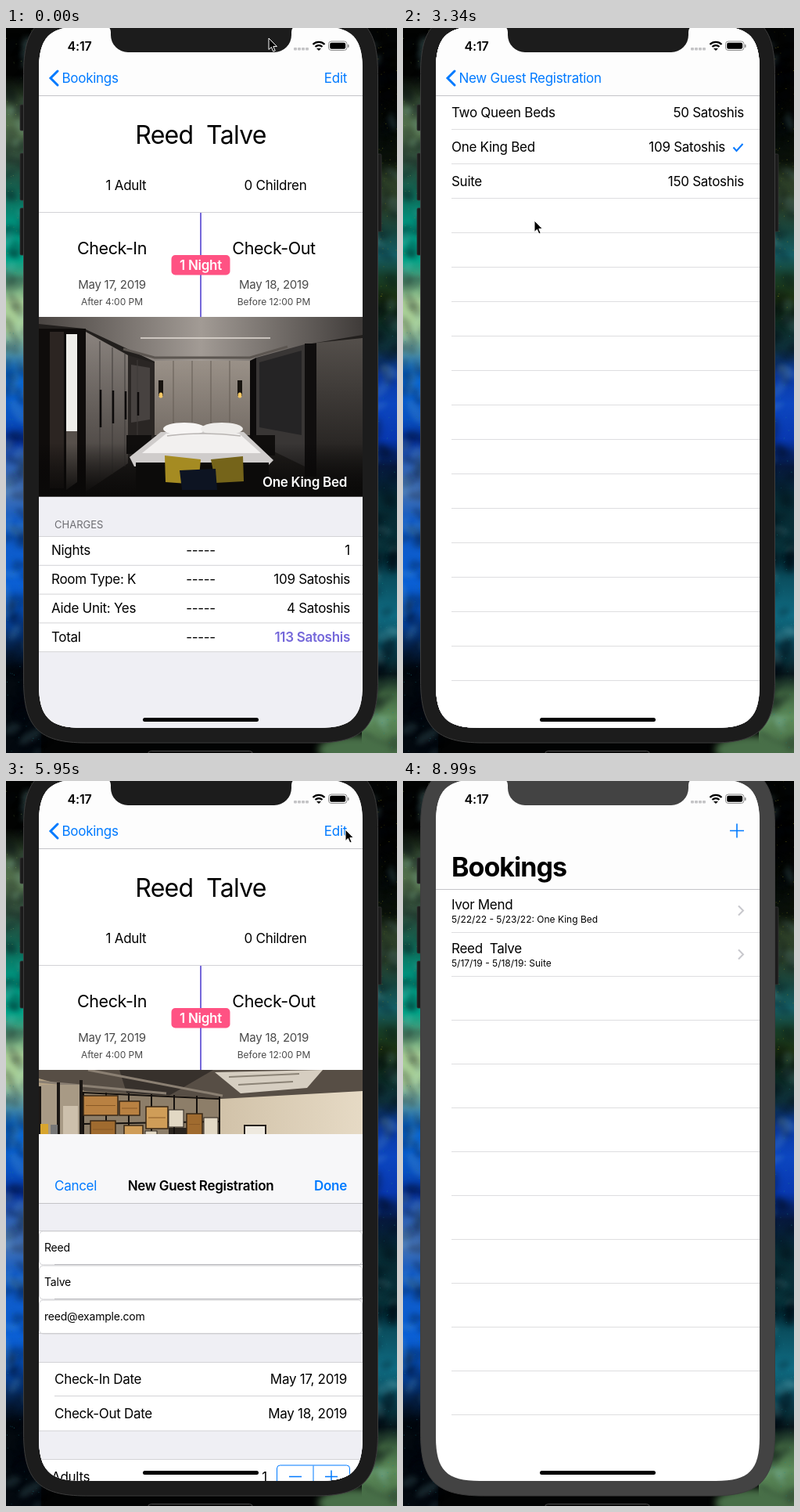
Animation, 500 px wide and 926 px high, one loop 9.09 s. Source, as an HTML page with a canvas:

```html
<!DOCTYPE html>
<html lang="en">
<head>
<meta charset="utf-8">
<title>Hotel bookings</title>
<style>
  html, body { margin: 0; width: 100%; height: 100%; overflow: hidden; background: #000; }
  canvas, svg { position: absolute; left: 0; top: 0; width: 500px; height: 926px; }
  svg { font-family: Inter, Roboto, sans-serif; }
</style>
</head>
<body>
<canvas id="sky" width="500" height="926"></canvas>
<svg id="stage" viewBox="0 0 500 926" xmlns="http://www.w3.org/2000/svg"></svg>
<script>
const LOOP = 9090;
const BLUE = '#007aff', PURPLE = '#7568da', GRAY = '#efeff4', RULE = '#d3d3d6';
const FIRST = 'Reed', LAST = 'Talve', GUEST = FIRST + '\u00a0 ' + LAST;

// Drawing helpers
const rect = (x, y, w, h, fill, extra = '') =>
  `<rect x="${x}" y="${y}" width="${w}" height="${h}" fill="${fill}" ${extra}/>`;
const poly = (points, fill) => `<polygon points="${points}" fill="${fill}"/>`;
const oval = (x, y, rx, ry, fill) => `<ellipse cx="${x}" cy="${y}" rx="${rx}" ry="${ry}" fill="${fill}"/>`;
const path = (d, stroke, width = 1, extra = '') =>
  `<path d="${d}" fill="none" stroke="${stroke}" stroke-width="${width}" ${extra}/>`;
const rule = (x, y, color = RULE) => path(`M${x} ${y}H456`, color);
const group = (attrs, ...parts) => `<g ${attrs}>${parts.join('')}</g>`;
const repeat = (n, draw) => Array.from({ length: n }, (_, i) => draw(i)).join('');

// y is the middle of the capitals
function text(x, y, s, { size = 17, weight = 400, fill = '#000', anchor = 'start', gap = -0.017, id = '' } = {}) {
  return `<text ${id && `id="${id}"`} x="${x}" y="${Math.round(y + size * 0.36)}" font-size="${size}" font-weight="${weight}"
    fill="${fill}" text-anchor="${anchor}" letter-spacing="${gap}em">${s}</text>`;
}
const right = (x, y, s, more = {}) => text(x, y, s, { anchor: 'end', ...more });
const middle = (x, y, s, more = {}) => text(x, y, s, { anchor: 'middle', ...more });
const either = (king, suite) => group('class="king"', king) + group('class="suite"', suite);
const chevron = (x, y) => path(`M${x} ${y - 6}l6 6l-6 6`, '#c7c7cc', 2);
const backArrow = id => path('M66 55L57 64L66 73', BLUE, 3, `id="${id}" stroke-linecap="round"`);

// Rectangle with continuous corners that each take up length e
function smoothBox(l, t, r, b, e) {
  const c = e * 0.245;
  return `M${l + e} ${t}H${r - e}C${r - c} ${t} ${r} ${t + c} ${r} ${t + e}V${b - e}C${r} ${b - c} ${r - c} ${b} ${r - e} ${b}` +
    `H${l + e}C${l + c} ${b} ${l} ${b - c} ${l} ${b - e}V${t + e}C${l} ${t + c} ${l + c} ${t} ${l + e} ${t}Z`;
}

function makeRandom(seed) {
  return () => (seed = (seed * 16807) % 2147483647) / 2147483647;
}

// Dusty colour clouds down both sides of the phone
function paintSky() {
  const ctx = document.getElementById('sky').getContext('2d');
  const rnd = makeRandom(77);
  const sides = [
    { x: 0, dust: ['#7f9a50', '#1d7a86'], stops: [
      [60, '#020302'], [82, '#1d2b1c'], [105, '#4c6848'], [135, '#55734e'], [170, '#2c4a3a'], [205, '#14604f'],
      [250, '#00957f'], [295, '#00a489'], [320, '#4f9a78'], [350, '#a9d096'], [385, '#a8cf98'], [415, '#4f90a0'],
      [440, '#0a6bd6'], [500, '#0850c0'], [525, '#06309a'], [560, '#2f62b4'], [595, '#4472b4'], [630, '#1059c4'],
      [710, '#0a5fd4'], [755, '#0848a8'], [785, '#062654'], [820, '#03090f']] },
    { x: 455, dust: ['#8c8a20', '#1c8a8c'], stops: [
      [90, '#030403'], [170, '#0c140a'], [192, '#2e4028'], [228, '#2a3f2a'], [260, '#17463f'], [290, '#155f66'],
      [318, '#173d28'], [345, '#1c3212'], [380, '#0c2a24'], [410, '#10333f'], [440, '#0a38a0'], [480, '#0c46c0'],
      [525, '#0838b0'], [560, '#06183c'], [600, '#072a33'], [665, '#083038'], [700, '#0a4c5c'], [750, '#0f6b82'],
      [790, '#0a4656'], [825, '#08181c'], [850, '#3f6440'], [880, '#5d8c5a'], [920, '#476c46']] }
  ];
  ctx.fillStyle = '#020303';
  ctx.fillRect(0, 0, 500, 926);
  for (const { x, stops, dust } of sides) {
    const tint = ctx.createLinearGradient(0, 0, 0, 926);
    stops.forEach(([y, color]) => tint.addColorStop(y / 926, color));
    ctx.fillStyle = tint;
    ctx.fillRect(x, 0, 45, 926);
    ctx.filter = 'blur(3px)';
    for (let i = 0; i < 170; i++) {
      ctx.fillStyle = rnd() < 0.8 ? 'rgba(0,4,12,.22)' : 'rgba(150,210,220,.14)';
      ctx.beginPath();
      ctx.ellipse(x + rnd() * 45, rnd() * 926, 3 + rnd() * 6, 5 + rnd() * 13, rnd() * 3, 0, 7);
      ctx.fill();
    }
    ctx.filter = 'none';
    for (let i = 0; i < 260; i++) {
      const y = rnd() * 926;
      ctx.globalAlpha = 0.15 + rnd() * 0.5;
      ctx.fillStyle = dust[y < 380 ? 0 : 1];
      ctx.fillRect(x + rnd() * 45, y, 1, 1);
    }
    ctx.globalAlpha = 1;
  }
  ctx.filter = 'blur(5px)';
  ctx.fillStyle = '#486f48';
  ctx.beginPath();
  ctx.ellipse(445, 922, 46, 18, 0, 0, 7);
  ctx.fill();
}

function kingPhoto() {
  return rect(42, 369, 414, 230, '#221f1d') +
    poly('42,369 456,369 456,392 385,404 312,426 190,426 100,384 42,378', 'url(#ceiling)') +
    path('M172 396H338', '#e3ddd6', 1.5) + path('M150 410L190 421H312L360 407', '#5c5651', 3) +
    rect(42, 384, 60, 214, '#0f0c0b') + rect(56, 388, 18, 200, '#2c2522') +
    rect(77, 391, 14, 124, '#efeeea') + poly('77,515 91,515 91,580 77,590', '#57504b') +
    poly('102,388 156,418 156,556 102,592', 'url(#wardrobe)') +
    poly('156,418 190,428 190,530 156,548', '#2a2624') + poly('160,430 184,434 184,500 160,504', '#474240') +
    repeat(4, i => path(`M${120 + i * 16} ${400 + i * 8}V${580 - i * 10}`, '#3f3a38') +
      path(`M${121 + i * 16} ${462 + i}v${48 - i * 6}`, '#0c0a0a', 2.5)) +
    rect(190, 425, 122, 95, 'url(#panel)') +
    repeat(4, i => path(`M${214 + i * 24} 425V505`, '#645c55')) +
    poly('312,425 320,421 320,530 312,524', '#0d0b0b') +
    poly('320,421 382,404 382,560 320,530', '#393635') + poly('324,427 378,412 378,520 324,510', '#252425') +
    rect(382, 403, 15, 170, '#100e0e') + poly('397,402 456,396 456,598 397,572', 'url(#wall)') +
    [198, 299].map(x => rect(x - 3, 450, 6, 20, '#181410') + oval(x, 469, 2.5, 3.5, '#f3c765')).join('') +
    rect(154, 520, 32, 24, '#100e0d') + rect(316, 520, 28, 26, '#100e0d') +
    rect(42, 530, 414, 69, 'url(#floor)') +
    poly('198,516 304,516 342,552 334,560 164,560 158,548', '#cfcccb') +
    poly('205,518 298,518 326,543 174,543', '#f2f0ef') +
    oval(228, 512, 27, 8, '#f7f5f4') + oval(276, 512, 27, 8, '#eeecea') +
    path('M206 521Q250 515 300 521', '#b9b5b3', 1.5) +
    rect(166, 555, 170, 43, '#0c0b0a') +
    poly('203,546 249,551 246,583 204,580', '#a58b22') + poly('262,551 303,547 304,579 268,581', '#75641a') +
    poly('222,565 268,563 270,590 225,590', '#0d1422') +
    right(436, 580, 'One King Bed', { weight: 600, fill: '#fff' });
}

function suitePhoto() {
  const wood = ['#b98142', '#cf9d58', '#a06b2f'];
  const crates = [[194, 402, 44, 25], [274, 416, 28, 28], [203, 434, 32, 22], [240, 409, 26, 18], [246, 440, 24, 27],
    [194, 483, 44, 28], [239, 474, 32, 34], [296, 478, 30, 27], [326, 425, 20, 27], [300, 452, 22, 20],
    [345, 462, 20, 24], [205, 530, 30, 24]];
  const pale = [[222, 459, 20, 20], [273, 447, 15, 30], [303, 420, 19, 22], [348, 430, 18, 26], [328, 480, 16, 24]];
  const boxes = crates.map((c, i) => rect(...c, wood[i % 3], 'stroke="#3a2916" stroke-width="1.5"') +
    path(`M${c[0] + 3} ${c[1] + c[3] / 2}h${c[2] - 6}`, '#8a5a26')).join('') +
    pale.map(p => rect(...p, '#e2d8c4', 'stroke="#2a231c"')).join('');
  const chair = x => poly(`${x},513 ${x + 38},511 ${x + 45},547 ${x + 8},551`, '#587a94') +
    poly(`${x + 10},544 ${x + 47},540 ${x + 47},549 ${x + 12},555`, '#87a3b5') +
    path(`M${x} 516l10 50M${x + 46} 532v29M${x + 11} 537h37M${x + 12} 538v28`, '#1c1917', 3);
  return group('transform="translate(-95 0)"',
    rect(137, 369, 414, 230, 'url(#plaster)'),
    poly('137,369 551,369 551,396 370,406 210,400 137,380', '#574e45'),
    poly('240,369 360,369 300,404 250,401', '#37312c'), path('M137 384L300 399M200 369L372 402', '#8a7f72', 3),
    poly('362,372 500,369 480,392 395,399', '#d6cec1'), path('M380 378L470 374M392 388L462 384', '#8b8376', 2),
    rect(137, 388, 56, 180, '#a89a85'), path('M138 390V570M162 385V565M191 382V560M137 464H165', '#1b1714', 4),
    rect(139, 438, 10, 13, '#d8a52e'), rect(152, 439, 9, 12, '#777'),
    rect(168, 415, 19, 140, '#cdc0ac'), rect(176, 482, 5, 10, '#b52424'),
    poly('137,568 193,556 370,520 551,545 551,598 137,598', 'url(#tiles)'),
    poly('193,396 368,405 368,520 193,566', '#8d7e69'), poly('303,443 326,443 326,478 303,478', '#2a241e'),
    repeat(7, i => path(`M${194 + i * 29} ${397 + i}V${562 - i * 7}`, '#15110e', 2)),
    repeat(5, i => path(`M193 ${398 + i * 40}L368 ${406 + i * 29}`, '#15110e', 2)), boxes,
    rect(400, 440, 27, 34, '#eee9df', 'stroke="#27221e" stroke-width="2"'), rect(406, 455, 15, 11, '#8a8985'),
    rect(368, 515, 183, 28, '#c9bca6'), rect(374, 505, 177, 24, '#eee6d7', 'rx="5"'),
    poly('368,540 551,545 551,556 376,550', '#7d6a50'),
    oval(398, 513, 14, 12, '#f5efe4'), oval(424, 515, 12, 13, '#e0d3c0'), oval(500, 514, 15, 13, '#f4eddf'),
    oval(290, 565, 56, 8, '#b7a58a'), oval(384, 592, 48, 8, '#b7a58a'),
    chair(260), chair(309),
    oval(223, 537, 17, 13, '#4d663a'), oval(236, 531, 9, 14, '#6f8a4d'), poly('216,552 239,552 235,574 221,574', '#eee9df'),
    poly('343,554 376,535 419,543 387,568', '#b48849'), path('M345 556V584L385 597V569M416 546V574L385 597', '#2a2420', 3),
    rect(366, 543, 19, 7, '#7b8b94', 'transform="rotate(8 375 546)"'), oval(440, 594, 28, 11, '#f2ecdf')
  ) + right(436, 580, 'Suite', { weight: 600, fill: '#fff' });
}

// Four rows of charges whose top edge is at y
function charges(y) {
  const row = (i, name, value, more) =>
    text(58, y + 18 + i * 37, name) + middle(249, y + 18 + i * 37, '-----') + right(440, y + 18 + i * 37, value, more);
  const bold = { weight: 600, fill: PURPLE };
  return text(62, y - 15, 'CHARGES', { size: 13, fill: '#6d6d72', gap: 0 }) +
    rect(42, y, 414, 148, '#fff') + repeat(5, i => rule(42, y + 0.5 + i * 36.8)) +
    row(0, 'Nights', '1') +
    either(row(1, 'Room Type: K', '109 Satoshis'), row(1, 'Room Type: KK', '150 Satoshis')) +
    row(2, 'Aide Unit: Yes', '4 Satoshis') +
    either(row(3, 'Total', '113 Satoshis', bold), row(3, 'Total', '154 Satoshis', bold));
}

const edgeShadow = rect(32, -2, 10, 896, 'url(#edge)');

function detailPage() {
  const stay = (x, title, date, hour) => middle(x, 281, title, { size: 21.5, gap: -0.02 }) +
    middle(x, 327.5, date, { size: 15, fill: '#4a4a4a' }) + middle(x, 349.5, hour, { size: 12, fill: '#4a4a4a', gap: 0 });
  return edgeShadow + rect(42, -2, 414, 896, '#fff') +
    middle(249, 136, GUEST, { size: 32, gap: -0.022 }) +
    middle(153.5, 201, '1 Adult') + middle(344.5, 201, '0 Children') + rule(42, 235.5) +
    stay(135.5, 'Check-In', 'May 17, 2019', 'After 4:00 PM') +
    stay(342.5, 'Check-Out', 'May 18, 2019', 'Before 12:00 PM') +
    rect(248, 236, 2, 133, PURPLE) + rect(211.5, 290, 75, 25.5, '#ff5283', 'rx="5"') +
    middle(249, 303, '1 Night', { weight: 600, fill: '#fff' }) +
    rect(42, 598, 414, 296, GRAY) + charges(649) +
    group('clip-path="url(#photo)"', either(kingPhoto(), suitePhoto()));
}

function bookingsPage() {
  const booking = (y, name, info) =>
    text(62, y, name) + text(62, y + 19, info, { size: 12, gap: 0 }) + chevron(429, y + 7.5);
  return rect(42, -2, 414, 896, '#fff') +
    booking(158, 'Ivor Mend', '5/22/22 - 5/23/22: One King Bed') +
    booking(214, GUEST, '5/17/19 - 5/18/19: Suite') +
    repeat(12, i => rule(62, 193.5 + i * 56, '#dedee0'));
}

function formPage() {
  const block = (y, h) => rect(42, y, 414, h, '#fff') + rule(42, y + 0.5) + rule(42, y + h);
  const field = (y, s) => rect(42.5, y - 21, 413, 43, '#fff', 'rx="5" stroke="#cfcfd2"') + text(49, y, s, { size: 14, gap: -0.015 });
  const pair = (y, name, value) => text(62, y, name) + right(436, y, value);
  const stepper = (y, name, n, off) => text(58, y, name) + right(334, y, n) +
    rect(346.5, y - 14.5, 93, 29, '#fff', `rx="4" stroke="${BLUE}"`) +
    path(`M393 ${y - 14}v28`, BLUE) + path(`M362 ${y}h16`, BLUE, 1.5, off ? 'opacity=".45"' : '') +
    path(`M408 ${y}h16m-8 -8v16`, BLUE, 1.5);
  return rect(42, -2, 414, 896, GRAY) +
    rect(42, 121, 414, 132, '#fff') + rule(42, 121.5) +
    field(143, FIRST) + field(187, LAST) + field(231, FIRST.toLowerCase() + '@example.com') +
    rule(62, 164.5, '#bcbcc0') + rule(62, 208.5, '#bcbcc0') + rule(42, 252.5, '#cfcfd2') +
    block(289, 88) + rule(62, 332.5) + pair(311, 'Check-In Date', 'May 17, 2019') + pair(355, 'Check-Out Date', 'May 18, 2019') +
    block(413, 90.5) + rule(62, 458.5) + stepper(435.5, 'Adults', '1') + stepper(481, 'Children', '0', true) +
    block(540, 47.5) + text(58, 564, 'In-Room AideUnit') + right(383, 564, '4 sat/night') +
    rect(395, 548, 51, 31, '#4cd964', 'rx="15.5"') + oval(431, 565.5, 13.5, 13.5, '#36b04d') + oval(430.5, 563.5, 13.5, 13.5, '#fff') +
    block(623, 44.5) + rect(42, 624, 414, 43, '#d9d9d9', 'id="pressed"') +
    text(62, 645.5, 'Room Type') + either(right(418, 645.5, 'One King Bed'), right(418, 645.5, 'Suite')) + chevron(429, 645.5) +
    charges(723);
}

function roomsPage() {
  const room = (y, name, price, on) => text(62, y, name) + right(on ? 412 : 436, y, price) +
    (on ? path(`M422.5 ${y + 0.5}l4 4.5l8 -9`, BLUE, 2) : '');
  return edgeShadow + rect(42, -2, 414, 896, '#fff') +
    room(108, 'Two Queen Beds', '50 Satoshis') +
    either(room(152, 'One King Bed', '109 Satoshis', true) + room(196, 'Suite', '150 Satoshis'),
      room(152, 'One King Bed', '109 Satoshis') + room(196, 'Suite', '150 Satoshis', true)) +
    repeat(17, i => rule(62, 129.5 + i * 44, '#dedee0'));
}

const baseBar = () => rect(42, -2, 414, 88, '#fdfdfd', 'id="barFill"') + group('id="barLine"', rule(42, 0.5, '#c4c4c8')) +
  backArrow('backMark') + text(0, 0, 'Bookings', { fill: BLUE, id: 'backLabel' }) +
  text(0, 0, 'Bookings', { size: 34, weight: 700, gap: -0.028, id: 'bigTitle' }) +
  right(436, 64, 'Edit', { fill: BLUE, id: 'edit' }) + path('M418 63.5h18m-9 -9v18', BLUE, 1.6, 'id="plus"');

const formBar = () => rect(42, -2, 414, 88, '#f7f7f9') + rect(42, -2, 414, 88, '#fdfdfd', 'id="whiteBar"') + rule(42, 86.5, '#c4c4c8') +
  group('id="formItems"', text(62, 64, 'Cancel', { fill: BLUE }), right(436, 64, 'Done', { fill: BLUE, weight: 600, id: 'done' })) +
  middle(249, 64, 'New Guest Registration', { weight: 600, id: 'formTitle' }) +
  group('id="roomsBack"', backArrow('roomsMark'), text(71.5, 64, 'New Guest Registration', { fill: BLUE, id: 'roomsLabel' }));

const statusBar = () => middle(94, 23, '4:17', { size: 16, weight: 600, gap: -0.01 }) +
  repeat(4, i => rect(368 + i * 5, 25, 4, 3.5, '#c4c4c6', 'rx="1"')) +
  path('M392.5 21a10.5 10.5 0 0 1 15 0M395.5 24a6.3 6.3 0 0 1 9 0', '#000', 2.3) + poly('400,29 397,26 403,26', '#000') +
  rect(412.5, 17, 23.5, 11.5, 'none', 'rx="3.5" stroke="#8c8c8c"') + rect(414.2, 18.7, 20, 8, '#000', 'rx="2"') +
  rect(437, 21, 1.6, 4, '#8c8c8c', 'rx=".8"');

const button = (x, y, h) => rect(x, y, 6, h, '#1b1b1b', 'rx="1.5" stroke="#343434" stroke-width=".8"');
const dim = id => rect(42, -2, 414, 896, '#000', `id="${id}"`);
const blend = (id, from, to, down, mid = '') => `<linearGradient id="${id}" ${down ? 'x2="0" y2="1"' : ''}>
  <stop stop-color="${from}"/>${mid && `<stop offset=".5" stop-color="${mid}"/>`}<stop offset="1" stop-color="${to}"/></linearGradient>`;

paintSky();
const stage = document.getElementById('stage');
stage.innerHTML = `<defs>
  <clipPath id="screen"><path d="${smoothBox(42, -2, 456, 894, 56)}"/></clipPath>
  <clipPath id="photo"><rect x="42" y="369" width="414" height="229.5"/></clipPath>` +
  blend('ceiling', '#4a4542', '#3f3b39', false, '#a29b95') + blend('wall', '#544f4b', '#151312', true) +
  blend('wardrobe', '#8a837e', '#3b3633', true) + blend('panel', '#9a9188', '#756d66', true) +
  blend('floor', 'transparent', '#0b0a09', true) + blend('plaster', '#b7a485', '#e6dac5') +
  blend('tiles', '#c7b393', '#ecdfc9') + blend('edge', 'transparent', 'rgba(0,0,0,.16)') + '</defs>' +
  rect(181.5, 923.5, 134, 20, '#0a0a0a', 'rx="4" stroke="#4c4c4c"') +
  button(18, 98, 33) + button(18, 160, 60) + button(18, 230, 60) + button(474, 161, 99) +
  `<path class="shell" d="${smoothBox(22.5, -21.5, 475.5, 913, 80)}" fill="#1c1c1c" stroke="#3d3d3d"/>` +
  group('clip-path="url(#screen)"',
    group('id="bookings"', bookingsPage()), dim('baseDim'), group('id="detail"', detailPage()), baseBar(),
    group('id="modal"', group('id="form"', formPage()), dim('formDim'), group('id="rooms"', roomsPage()), formBar()),
    statusBar()) +
  '<path class="shell" d="M126 -3Q134 -2 134 5V9A22 22 0 0 0 156 31H343A22 22 0 0 0 365 9V5Q365 -2 373 -3Z" fill="#1c1c1c"/>' +
  rect(175, 881, 148, 5, '#000', 'rx="2.5"') +
  '<path id="cursor" d="M0 0V14.5L3.4 11.4L5.8 17L8.2 16L5.8 10.6H10.4Z" fill="#000" stroke="#fff" stroke-width="1"/>';

const el = {};
stage.querySelectorAll('[id]').forEach(node => { el[node.id] = node; });
const shells = stage.querySelectorAll('.shell');
const kings = stage.querySelectorAll('.king'), suites = stage.querySelectorAll('.suite');

const clamp = v => Math.max(0, Math.min(1, v));
const mix = (a, b, p) => a + (b - a) * p;
const move = (node, x, y, scale = 1) => node.setAttribute('transform', `translate(${x} ${y}) scale(${scale})`);
const snap = (node, x, y) => move(node, Math.round(x), Math.round(y));
const fade = (node, v) => node.setAttribute('opacity', clamp(v));
const show = (node, on) => node.setAttribute('display', on ? 'inline' : 'none');

// Critically damped spring from 0 to 1
function spring(t, start) {
  const u = Math.max(0, t - start) * 0.016;
  return u > 8.3 ? 1 : 1 - (1 + u) * Math.exp(-u);
}

const trail = [
  [60, 336, 13], [430, 430, 61], [900, 440, 62], [1080, 440, 62], [1560, 314, 838], [1710, 314, 841],
  [1950, 314, 841], [2450, 308, 648], [2900, 308, 648], [3340, 168, 246], [3660, 161, 206], [3840, 159, 207],
  [3990, 159, 207], [4350, 78, 66], [4900, 78, 66], [5600, 434, 62], [6200, 434, 62], [6390, 399, 66],
  [6510, 399, 66], [6620, 220, 92], [6740, 65, 73], [8270, 65, 73], [8690, 404, 928]
];

function cursorAt(t) {
  const i = trail.findIndex(k => k[0] > t);
  if (i < 1) return (i ? trail[trail.length - 1] : trail[0]).slice(1);
  const [a, b] = [trail[i - 1], trail[i]];
  const p = (t - a[0]) / (b[0] - a[0]), e = p * p * (3 - 2 * p);
  return [mix(a[1], b[1], e), mix(a[2], b[2], e)];
}

function update(t) {
  const sheet = spring(t, 580) - spring(t, 5845);
  const push = spring(t, 2720) - spring(t, 4422);
  const pop = spring(t, 7153.4), bar = Math.pow(pop, 1.25);
  const suite = t >= 3840;
  kings.forEach(n => show(n, !suite));
  suites.forEach(n => show(n, suite));

  snap(el.detail, 414 * pop, 0);
  show(el.detail, pop < 1);
  snap(el.bookings, -124 * (1 - pop), 0);
  fade(el.baseDim, 0.11 * (1 - pop));
  const grown = Math.round(52 * bar);
  el.barFill.setAttribute('height', 88 + grown);
  move(el.barLine, 0, 86 + grown);
  const x = mix(71.5, 62, bar), y = mix(64, 110, bar), grow = mix(1, 2.07, bar);
  const tapped = t > 6900 && t < 7150 ? 0.35 : 1;
  move(el.backLabel, x, y, grow);
  fade(el.backLabel, tapped * (1 - 4.4 * bar));
  fade(el.backMark, tapped * (1 - 5 * pop));
  move(el.bigTitle, x, y, grow / 2.07);
  fade(el.bigTitle, (bar - 0.2) / 0.8);
  fade(el.edit, t > 480 && t < 580 ? 0.35 : 1 - pop);
  fade(el.plus, pop * pop);

  snap(el.modal, 0, 896 * (1 - sheet));
  show(el.modal, sheet > 0);
  snap(el.form, -124 * push, 0);
  fade(el.formDim, 0.1 * push);
  snap(el.rooms, 414 * (1 - push), 0);
  show(el.rooms, push > 0);
  fade(el.pressed, t < 2640 ? 0 : 1 - (t - 4422) / 500);
  fade(el.whiteBar, push);
  fade(el.formItems, 1 - 1.6 * push);
  fade(el.done, t > 5720 && t < 5850 ? 0.35 : 1);
  move(el.formTitle, -90 * push, 0);
  fade(el.formTitle, 1 - 1.6 * push);
  move(el.roomsLabel, 90 * (1 - push), 0);
  fade(el.roomsBack, push * push);

  shells.forEach(n => n.setAttribute('fill', t >= 8990 ? '#434343' : '#1c1c1c'));
  snap(el.cursor, ...cursorAt(t));
  show(el.cursor, t < 8690);
}

function tick() {
  update(performance.now() % LOOP);
  requestAnimationFrame(tick);
}
tick();
</script>
</body>
</html>
```
